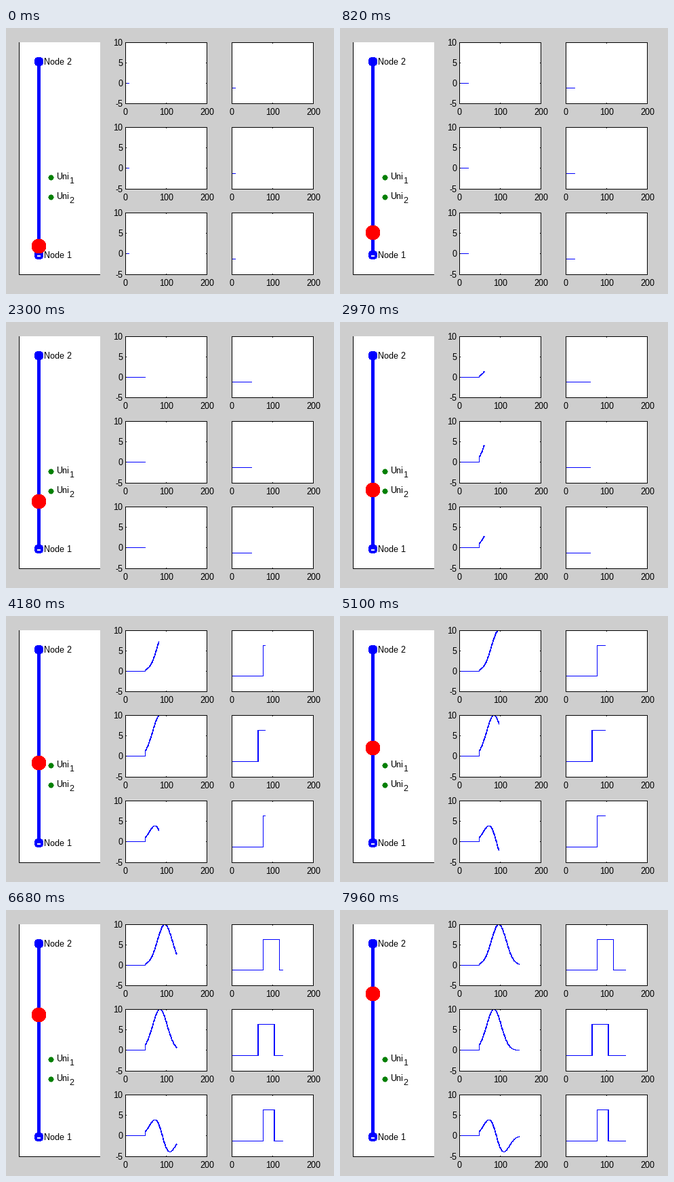
Write a matplotlib script that moves like this. It is 484 px wide and 392 px high and loops after 8000 ms.

```python
import numpy as np
import matplotlib.pyplot as plt
from matplotlib.animation import FuncAnimation
from matplotlib.patches import Circle, Rectangle

plt.rcParams.update({
    "font.family": "Liberation Sans",
    "text.hinting": "native",
    "text.hinting_factor": 1,
    "path.snap": False,
    "path.simplify": False,
    "toolbar": "None",
})

W, H, DPI = 484, 392, 100
PX = 72 / DPI            # points per pixel
LOOP, STEP = 8000, 40
BLUE, GREEN = (0, 0, 1), (0, 0.5, 0)

fig = plt.figure(figsize=(W / DPI, H / DPI), dpi=DPI, facecolor=(206 / 255,) * 3)
ax = fig.add_axes([0, 0, 1, 1])
ax.set(xlim=(-0.5, W - 0.5), ylim=(H - 0.5, -0.5))  # integers are pixel centres
ax.axis("off")


def line(x, y, color="k", width=1, z=3, cap="projecting"):
    return ax.plot(x, y, color=color, lw=width * PX, zorder=z, antialiased=False,
                   solid_capstyle=cap, solid_joinstyle="miter")[0]


def panel(x0, y0, x1, y1):
    ax.add_patch(Rectangle((x0 - 0.5, y0 - 0.5), x1 - x0 + 1, y1 - y0 + 1,
                           fc="w", lw=0, zorder=0, antialiased=False))


def disc(x, y, r, color, z):
    return ax.add_patch(Circle((x, y), r, fc=color, lw=0, zorder=z, antialiased=False))


def label(x, y, text, ha="left", size=13):
    ax.text(x, y, text, ha=ha, va="baseline", fontsize=size * PX, zorder=4)


# track with two nodes and two sensors
panel(19, 21, 138, 363)
line([19, 19, 138], [21, 363, 363])
NODE1, NODE2, TRACK = 334, 49, 48
disc(TRACK, NODE2, 6.5, BLUE, 2)
disc(TRACK, NODE1, 6.5, BLUE, 2)
disc(TRACK, NODE1 + 0.5, 2, "w", 2.5)
line([TRACK + 0.5 - 0.5] * 2, [NODE2, NODE1], BLUE, 4, 3, "butt")
label(56, NODE2 + 4.5, "Node 2")
label(56, NODE1 + 4.5, "Node 1")
for i, y in enumerate((220, 249), 1):
    disc(66, y, 3.2, GREEN, 3)
    line([62, 70], [y, y], GREEN)
    line([66, 66], [y - 4, y + 4], GREEN)
    label(74, y + 2.5, "Uni")
    label(93, y + 8.5, str(i), size=12)
ball = disc(TRACK, NODE1, 10.3, "r", 5)

# signals over the step number
s = np.arange(201)


def bell(centre):
    return np.where(s > 48, 10 * np.exp(-((s - centre) / 18) ** 2 / 2), 0)


upper, lower = bell(96.5), bell(84.5)
on_upper, on_lower = upper > 5.4, lower > 5.4
rows = [
    (21, 111, upper, on_upper),
    (146, 237, lower, on_lower),
    (272, 363, lower - upper, on_upper & on_lower),
]

curves = []


def chart(x0, top, bottom, data, lo, hi, yticks=()):
    x1, h = x0 + 120, bottom - top

    def to_y(v):
        return np.round(bottom - 0.3 - (v - lo) / (hi - lo) * h)

    panel(x0, top, x1, bottom)
    line([x0, x1, x1, x0, x0], [top, top, bottom, bottom, top])
    for v in (0, 100, 200):
        x = x0 + 0.6 * v
        label(x, bottom + 16.5, str(v), "center")
        if v == 100:
            line([x, x], [top, top + 1])
            line([x, x], [bottom, bottom - 1])
    for v in yticks:
        y = to_y(v)
        label(x0 - 4, y + 4.5, str(v), "right")
        if lo < v < hi:
            line([x0, x0 + 1], [y, y])
            line([x1, x1 - 1], [y, y])
    xs, ys = np.round(x0 + 0.6 * s), to_y(np.asarray(data, float))
    curves.append((line([], [], BLUE, z=2), xs, ys))


for top, bottom, signal, flag in rows:
    chart(176, top, bottom, signal, -5, 10, (-5, 0, 5, 10))
    chart(333, top, bottom, flag, -0.5, 1.5)

# step count against time in ms
TIMES = (0, 1610, 2970, 4180, 5100, 6680, 7960)
COUNTS = (9, 36, 61, 83, 98, 126, 148)


def update(i):
    n = int(round(np.interp((i + 0.5) * STEP, TIMES, COUNTS)))
    ball.center = TRACK, round(NODE1 - n * (NODE1 - NODE2) / 200)
    for curve, xs, ys in curves:
        curve.set_data(xs[:n], ys[:n])
    return [ball] + [c[0] for c in curves]


anim = FuncAnimation(fig, update, frames=LOOP // STEP, interval=STEP,
                     repeat=True, repeat_delay=0, blit=False)
plt.show()
```
